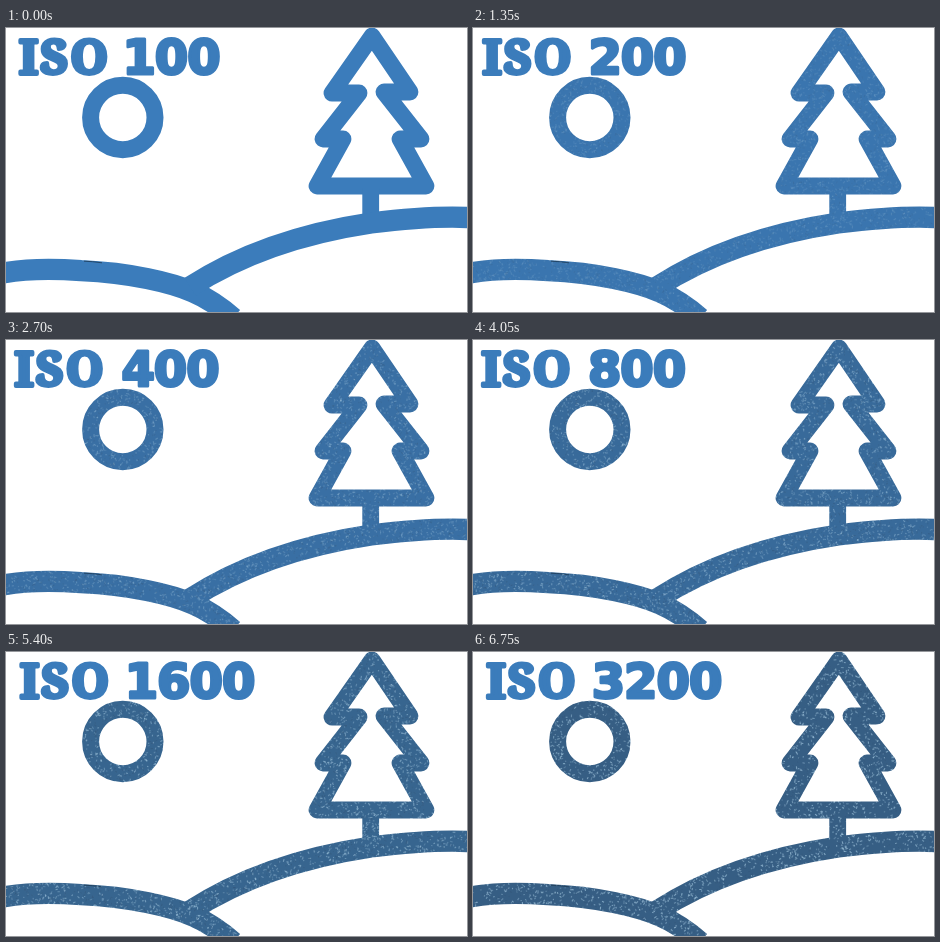
These frames come from a looping animation (461 px wide and 284 px high, 8.1 s). An HTML page with a canvas:

```html
<!DOCTYPE html>
<html lang="en">
<head>
<meta charset="utf-8">
<title>Film speed and grain</title>
<style>
  html, body { margin: 0; width: 100%; height: 100%; overflow: hidden; background: #fff; }
  canvas { display: block; }
</style>
</head>
<body>
<canvas id="stage" width="461" height="284"></canvas>
<script>
const ctx = document.getElementById('stage').getContext('2d');
const WIDTH = 461, HEIGHT = 284, STEP_MS = 1350;
const BLUE = '#3b7cbb';

// Centres of the two words shift a little as the number changes width.
const steps = [
  { iso: 100,  base: BLUE,      grain: 0,    isoX: 57.5, numberX: 165.5 },
  { iso: 200,  base: '#3a75af', grain: 0.2,  isoX: 54,   numberX: 164.5 },
  { iso: 400,  base: '#396fa4', grain: 0.35, isoX: 53,   numberX: 164.5 },
  { iso: 800,  base: '#386a9a', grain: 0.47, isoX: 53,   numberX: 164 },
  { iso: 1600, base: '#37658f', grain: 0.57, isoX: 58.5, numberX: 184 },
  { iso: 3200, base: '#365e84', grain: 0.66, isoX: 58,   numberX: 184 }
];

const tree = new Path2D(
  'M366 8 L326 65 H353 L317 111 H337 L311 158 H420 L394 111 H415 L378 64 H404 Z');
const trunk = new Path2D('M364.7 160 V190');
const leftHill = new Path2D(
  'M-8 246 Q25 239 75 242.7 C125 245 165 254.5 187 264 Q208 273 227 290');
const rightHill = new Path2D('M184 259 Q258 211 365 195 Q430 187 470 190');
const sun = new Path2D();
sun.arc(116.8, 89.5, 32.2, 0, Math.PI * 2);

function seededRandom(seed) {
  return () => {
    seed = (Math.imul(seed, 1664525) + 1013904223) >>> 0;
    return seed / 4294967296;
  };
}

function stroke(path, width) {
  ctx.lineWidth = width;
  ctx.stroke(path);
}

function drawScene(color) {
  ctx.strokeStyle = color;
  ctx.lineJoin = 'round';
  stroke(sun, 17);
  stroke(tree, 16.8);
  stroke(trunk, 16.8);
  stroke(leftHill, 21.3);
  stroke(rightHill, 21.3);
  ctx.strokeStyle = '#1d3a55';
  stroke(new Path2D('M78 233.2 Q86 233.4 96 234.8'), 0.8);
}

// Short flecks that only land on what is already painted.
function drawGrain(strength, seed) {
  const random = seededRandom(seed);
  ctx.save();
  ctx.globalCompositeOperation = 'source-atop';
  ctx.lineWidth = 1.1;
  for (let i = 0; i < 13000; i++) {
    const x = random() * WIDTH, y = random() * HEIGHT;
    const angle = random() * Math.PI, length = 1 + random() * 1.8;
    ctx.globalAlpha = strength * (0.4 + random() * 0.6);
    ctx.strokeStyle = random() < 0.65 ? '#a5cae2' : '#30557a';
    ctx.beginPath();
    ctx.moveTo(x, y);
    ctx.lineTo(x + Math.cos(angle) * length, y + Math.sin(angle) * length);
    ctx.stroke();
  }
  ctx.restore();
}

function drawWord(word, x, font, weight) {
  ctx.font = font;
  ctx.lineWidth = weight;
  ctx.fillText(word, x, 46);
  ctx.strokeText(word, x, 46);
}

function drawLabel({ iso, isoX, numberX }) {
  ctx.textAlign = 'center';
  ctx.fillStyle = ctx.strokeStyle = BLUE;
  ctx.letterSpacing = '2px';
  drawWord('ISO', isoX + 1, '900 48px "Noto Serif", serif', 4);
  ctx.letterSpacing = '-1px';
  drawWord(String(iso), numberX - 0.5, 'bold 48px "DejaVu Sans", sans-serif', 3);
}

let shown = -1;
function frame(now) {
  const index = Math.floor(now / STEP_MS) % steps.length;
  if (index !== shown) {
    shown = index;
    const step = steps[index];
    ctx.clearRect(0, 0, WIDTH, HEIGHT);
    drawScene(step.base);
    if (step.grain) drawGrain(step.grain, step.iso);
    drawLabel(step);
  }
  requestAnimationFrame(frame);
}
frame(0);
</script>
</body>
</html>
```
